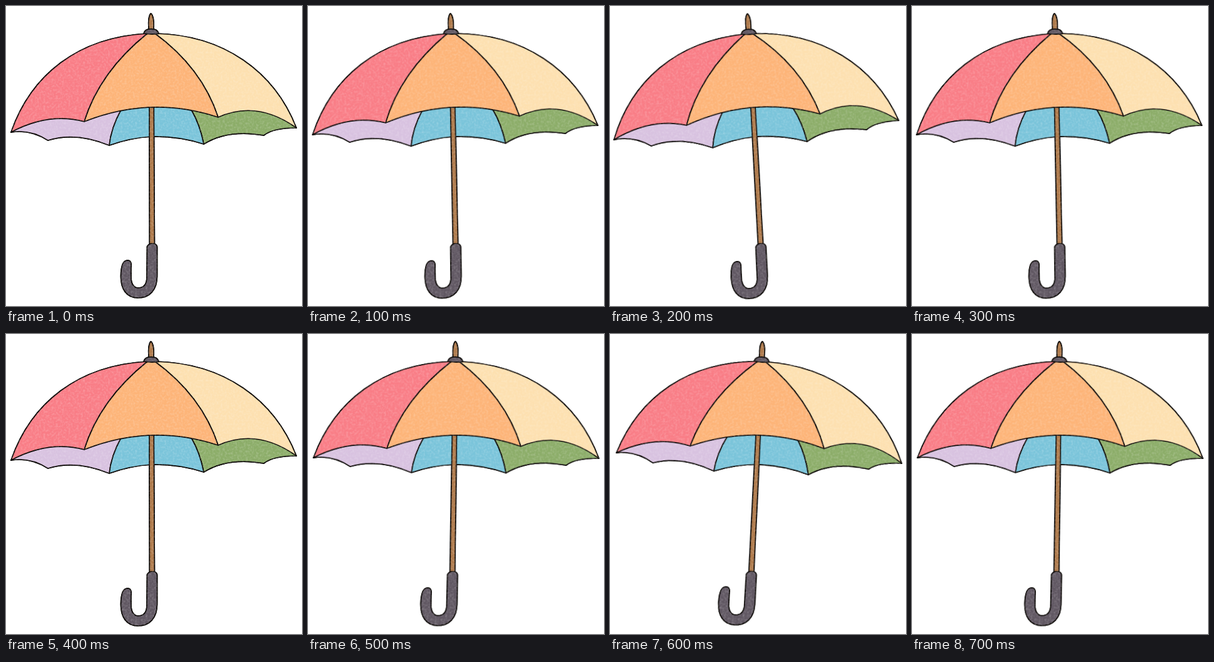
Animation of 473 by 480 pixels, one loop 0.8 s. Source, as an HTML page:

```html
<!DOCTYPE html>
<html lang="en">
<head>
<meta charset="utf-8">
<title>Swaying umbrella</title>
<style>
  html, body { margin: 0; width: 100%; height: 100%; overflow: hidden; background: #fff; }
  svg { display: block; width: 100%; height: 100%; }
  #umbrella {
    transform-origin: 236.5px 240px;
    animation: sway 800ms step-end infinite;
  }
  @keyframes sway {
    0%    { transform: rotate(0deg); }
    12.5% { transform: rotate(-1deg); }
    25%   { transform: rotate(-3deg); }
    37.5% { transform: rotate(-1deg); }
    50%   { transform: rotate(0deg); }
    62.5% { transform: rotate(1deg); }
    75%   { transform: rotate(3deg); }
    87.5% { transform: rotate(1deg); }
    100%  { transform: rotate(0deg); }
  }
  #umbrella path { stroke: #0c0907; stroke-width: 1.7; stroke-linejoin: round; }
  .red    { fill: #f97d86; }
  .orange { fill: #fdb478; }
  .cream  { fill: #fde0b0; }
  .lilac  { fill: #d8c2e0; }
  .blue   { fill: #7ac4da; }
  .green  { fill: #8cad69; }
  .wood   { fill: #ae794a; }
  .grip   { fill: #605762; }
</style>
</head>
<body>
<svg viewBox="0 0 473 480">
  <defs>
    <!-- pale paper grain laid over the fills -->
    <filter id="grain" filterUnits="userSpaceOnUse" x="0" y="0" width="473" height="480" color-interpolation-filters="sRGB">
      <feTurbulence type="fractalNoise" baseFrequency=".3" numOctaves="2" seed="4"/>
      <feColorMatrix values="0 0 0 0 1  0 0 0 0 1  0 0 0 0 1  .45 0 0 0 -.185"/>
      <feComposite in2="SourceGraphic" operator="atop" result="flecks"/>
      <feMerge>
        <feMergeNode in="SourceGraphic"/>
        <feMergeNode in="flecks"/>
      </feMerge>
    </filter>
  </defs>
  <g id="umbrella">
    <g filter="url(#grain)">
      <!-- underside, its upper edges hidden by the canopy -->
      <path class="lilac" d="M8 202Q39 197 67 215Q112 201 165 223Q168 195 184 166L184 140L60 150Z"/>
      <path class="green" d="M296 166Q310 190 316 221Q354 197 412 207Q427 195 464 195L420 130L296 140Z"/>
      <path class="blue" d="M184 166Q168 195 165 223Q198 211 232 209Q276 208 316 221Q310 190 296 166V140H184Z"/>
      <!-- shaft -->
      <path class="wood" d="M229 150L229.4 384H237.4L236.2 150Z"/>
      <!-- canopy -->
      <path class="red" d="M8 202C40 110 115 50 226 44Q150 105 125 185Q68 170 8 202Z"/>
      <path class="cream" d="M238 44C348 46 429 105 464 195Q401 150 339 178Q313 99 238 44Z"/>
      <path class="orange" d="M226 44Q150 105 125 185Q232 142.5 339 178Q313 99 238 44Z"/>
      <!-- tip -->
      <path class="wood" d="M228.6 39C227 29 227.6 15 231.5 12C236 15 237 29 235.4 39Z"/>
      <path class="grip" d="M220 44C221 40 225 36.7 232 36.7C239 36.7 243 40 244.3 44.3Q232 46 220 44Z"/>
      <!-- handle -->
      <path class="grip" d="M225.5 385Q228 380 234 380Q240.5 380 241.5 385V432C241.5 455 229 467 211 467C192 467 183.5 452 183.5 433C183.5 420 186 408 193 407C199 406.5 201 411 200 418C199.4 424 200 430 200 435C200 445 205 451 211 451C220 451 225 445 225 434Z"/>
    </g>
  </g>
</svg>
</body>
</html>
```
